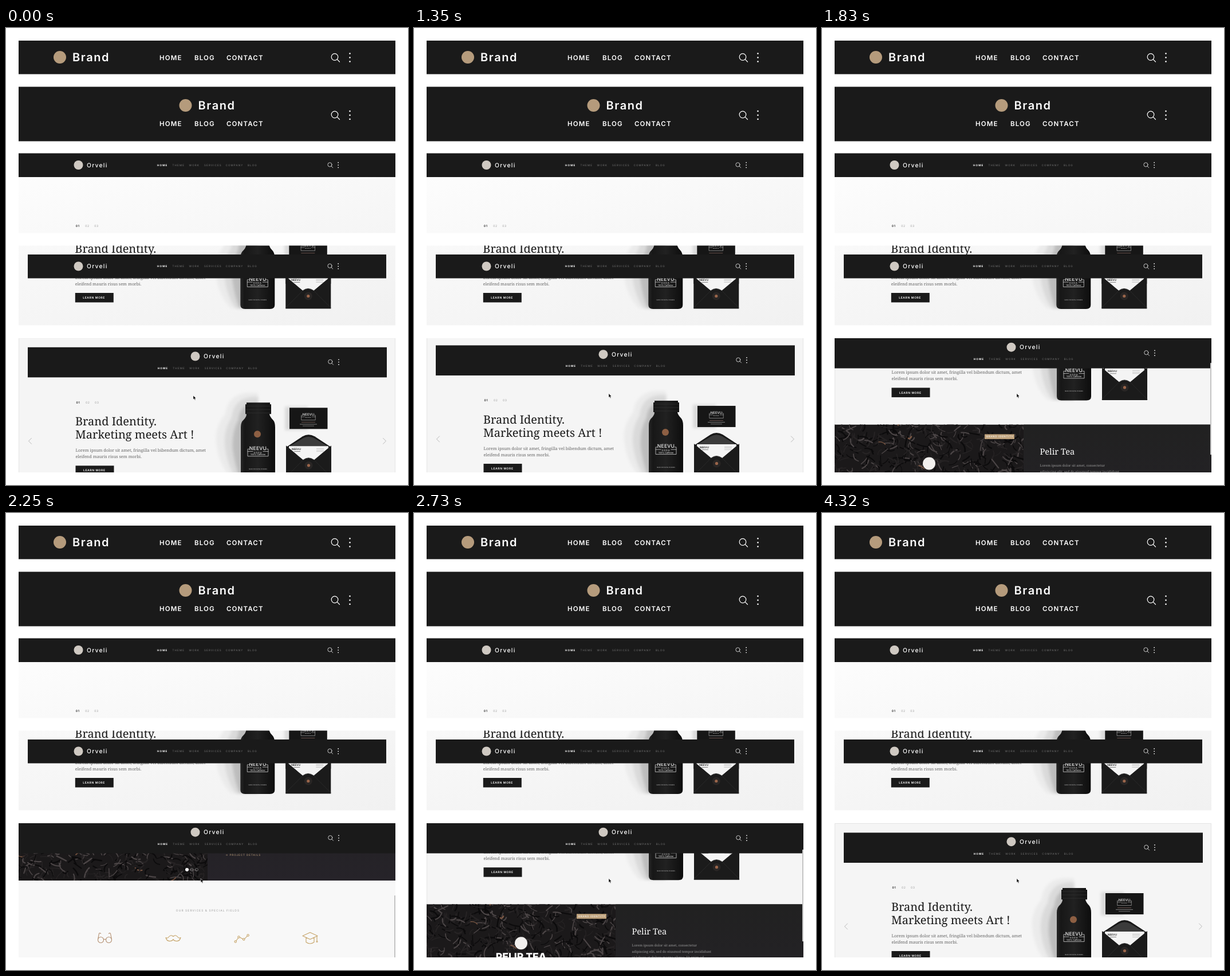
Write an HTML page that moves like this. It is 702 by 797 pixels and loops after 4950 ms.

```html
<!DOCTYPE html>
<html lang="en">
<head>
<meta charset="utf-8">
<title>Header layouts</title>
<style>
  html, body { margin: 0; width: 100%; height: 100%; overflow: hidden; background: #fff; }
  svg { display: block; }
  text { font-family: Inter, sans-serif; text-rendering: geometricPrecision; white-space: pre; }
  .serif { font-family: "Noto Serif", serif; }
  .mid { text-anchor: middle; }
  .line { fill: none; stroke-linecap: round; stroke-linejoin: round; }
</style>
</head>
<body>
<svg id="stage" width="702" height="797" viewBox="0 0 702 797"></svg>
<script>
const INK = '#1a1a1a', GOLD = '#b59b7c', LOOP = 4950;

const rect = (x, y, w, h, fill, more = '') =>
  `<rect x="${x}" y="${y}" width="${w}" height="${h}" fill="${fill}" ${more}/>`;
const dot = (x, y, r, fill, more = '') => `<circle cx="${x}" cy="${y}" r="${r}" fill="${fill}" ${more}/>`;
const path = (d, fill, more = '') => `<path d="${d}" fill="${fill}" ${more}/>`;
const line = (d, stroke, width = 1) => `<path class="line" d="${d}" stroke="${stroke}" stroke-width="${width}"/>`;
const text = (x, y, size, str, fill, spacing = 0, more = '') =>
  `<text x="${x}" y="${y}" font-size="${size}" fill="${fill}" letter-spacing="${spacing}" ${more}>${str}</text>`;
const shift = (x, y, body, id = '') => `<g id="${id}" transform="translate(${x} ${y})">${body}</g>`;
const view = (x, y, w, h, body) =>
  `<svg x="${x}" y="${y}" width="${w}" height="${h}" viewBox="${x} ${y} ${w} ${h}">${body}</svg>`;
const BOLD = 'font-weight="600"', MEDIUM = 'font-weight="500"', SERIF = 'class="serif"', MID = 'class="mid"';
const SOFT = 'filter="url(#soft)"';

// Seeded random numbers for the tea leaves
let seed = 7;
const random = () => (seed = seed * 16807 % 2147483647) / 2147483647;

// Search lens and menu dots, centred on y = 0
const tools = (x, y, k, gap) => shift(x, y,
  `<g transform="scale(${k})"><circle class="line" cx="0" cy="-1" r="5.8" stroke="#fff" stroke-width="1.2"/>` +
  line('M4.2 3.2L8.5 7.5', '#fff', 1.2) + '</g>' +
  [-1, 0, 1].map(i => dot(gap, i * 7 * k, 1.25 * k + .1, '#fff')).join(''));

const bigLogo = (x, y) => dot(x, y, 11, GOLD) + text(x + 22, y + 7, 20, 'Brand', '#fff', 1.6, BOLD);
const bigMenu = y => [['HOME', 268], ['BLOG', 329], ['CONTACT', 385]]
  .map(([s, x]) => text(x, y, 11.5, s, '#fff', 1.15, BOLD)).join('');
const smallLogo = (x, y) => dot(x, y, 8, '#cfc9c2') + text(x + 14.5, y + 3.7, 10.4, 'Orveli', '#fff', 1.2, MEDIUM);
const smallMenu = (x, y) =>
  [['HOME', 0], ['THEME', 26.5], ['WORK', 55.5], ['SERVICES', 82], ['COMPANY', 119.5], ['BLOG', 158]]
  .map(([s, dx], i) => text(x + dx, y, 4.6, s, i ? '#777' : '#fff', 1.1, i ? '' : 'font-weight="700"')).join('');
const smallBar = y => smallLogo(126.5, y) + smallMenu(264, y + 1.7) + tools(565.5, y, .62, 14.7);

const pager = text(122.5, 655.3, 5, '01', '#111', .6, BOLD) +
  text(139, 655.3, 5, '02', '#999', .6) + text(155, 655.3, 5, '03', '#999', .6);

const copy = text(121, 693.8, 20, 'Brand Identity.', INK, 0, SERIF) +
  text(121, 717, 20, 'Marketing meets Art !', INK, 0, SERIF) +
  text(121.5, 739.6, 7.35, 'Lorem ipsum dolor sit amet, fringilla vel bibendum dictum, amet', '#666', 0, SERIF) +
  text(121.5, 751, 7.35, 'eleifend mauris risus sem morbi.', '#666', 0, SERIF) +
  rect(121.5, 764, 67, 16.5, INK) + text(135, 774.1, 5, 'LEARN MORE', '#fff', .6, BOLD);

const label = (x, y, k) => `<g transform="translate(${x} ${y}) scale(${k})">` +
  text(0, 0, 8.6, 'NEEVU', '#eee', .2, `${MID} ${MEDIUM}`) + text(0, 5.8, 4, 'SODA', '#eee', 1, MID) +
  line('M-15 -1.5H-18V11H18V-1.5H15M-18 2.6H-9M9 2.6H18', '#ccc', .8) + '</g>';

const bottle =
  path('M440 637Q388 632 383 674Q362 700 368 730Q373 765 394 785H440Z', '#ebebeb', SOFT) +
  path('M440 644Q398 642 394 680Q378 705 383 735Q388 768 403 785H440Z', '#dadada', SOFT) +
  path('M440 655Q408 655 406 684Q394 705 396 735Q400 765 408 783H440Z', '#bdbdbd', SOFT) +
  path('M420 654H461V657H463V674H460Q461 679 466 684Q470 688 470 697V779Q470 786 462 786H418Q410 786 410 779V697' +
    'Q410 688 415 684Q420 679 420 674H418V657H420Z', 'url(#glass)') +
  line('M420 660H461M419 666H462M420 672H461', '#303030', .8) +
  dot(439, 709, 6, '#8d5f43') + label(440, 736.5, 1) +
  text(440, 746, 3.8, '100% Caffeine', '#eee', 0, MID) +
  text(440, 771, 2.2, 'MADE FOR DIGITAL PIONEERS', '#ddd', 0, MID);

const card = rect(487, 661, 40, 41, '#dadada', SOFT) + rect(495, 663, 66.5, 37, '#161616') +
  label(528, 677, .68) + rect(516, 688, 24, .7, '#8a6a64') + rect(513, 691.3, 30, .8, '#999') + rect(518, 694.3, 20, .8, '#888');

const envelope =
  path('M489 732L518 713Q528 707 539 713L568 732V742H489Z', '#181818') +
  path('M494 731L519 716Q528 711 538 716L563 731Z', '#3b3b3b') +
  path('M494 730H563V742L529 762L494 742Z', '#f4f4f4') +
  text(499, 737, 4.6, 'NEEVU', '#222', 0, BOLD) + rect(503, 739, 11, .7, '#555') +
  [734, 736.5, 739].map(y => rect(542, y, 13, .6, '#aaa')).join('') +
  path('M489 729L519 754Q528 747 538 754L568 729V785.5H489Z', '#1b1b1b') +
  line('M489 784L519 754Q528 747 538 754L568 784', '#2c2c2c', .8) +
  dot(528.5, 763.5, 7, '#292625') + dot(528.5, 763.5, 2.6, '#9a654a');

const products = bottle + card + envelope;

const leafTone = r => r < .4 ? '#0c0b0c' : r < .72 ? '#262324' : r < .98 ? '#4b4546' : '#7a5642';
const leaves = Array.from({ length: 950 }, () => {
  const x = 17 + random() * 335, y = 824 + random() * 216, a = random() * 7, n = 7 + random() * 12, b = random() * 12 - 6;
  const dx = Math.cos(a) * n, dy = Math.sin(a) * n;
  return line(`M${x} ${y}q${dx / 2 - b * dy / n} ${dy / 2 + b * dx / n} ${dx} ${dy}`, leafTone(random()), 1 + random() * 1.6);
}).join('');

const project = view(22, 828, 330, 212, rect(22, 828, 330, 212, '#1b191a') + leaves) +
  rect(352, 828, 328, 212, 'url(#plum)') +
  rect(284, 845, 52, 8.5, '#c0a37d') + text(287, 851, 4.5, 'BRAND IDENTITY', '#fff', .7) +
  dot(187, 896, 11, '#f2f0ee') +
  text(187, 925.5, 17.5, 'PELIR TEA', '#fff', 0, `${MID} font-weight="800"`) +
  dot(316, 1021, 3, '#fff') +
  [324.5, 333].map(x => dot(x, 1021, 2.4, 'none', 'stroke="#888" stroke-width=".8"')).join('') +
  text(380.5, 880.5, 14.6, 'Pelir Tea', '#fff', 0, SERIF) +
  ['Lorem ipsum dolor sit amet, consectetur', 'adipiscing elit, sed do eiusmod tempor incididunt',
   'ut labore et dolore magna aliqua. Ut enim ad', 'minim veniam, quis nostrud exercitation ullamco',
   'laboris nisi ut aliquip.'].map((s, i) => text(380.5, 902 + i * 10.6, 5.9, s, '#999', 0, SERIF)).join('') +
  text(383, 996.7, 4.6, '→ PROJECT DETAILS', '#c0a37d', .9);

const icons = [
  'M-12 3a5 5 0 1 0 10 0a5 5 0 1 0 -10 0M2 3a5 5 0 1 0 10 0a5 5 0 1 0 -10 0M-2 2.5Q0 1 2 2.5M-12 2L-10 -8Q-9 -10 -7 -8M12 2L10 -8Q9 -10 7 -8',
  'M0 -3Q-4 -7 -8 -2Q-10 1 -13 -1Q-11 6 -5 5Q-1 4.5 0 2Q1 4.5 5 5Q11 6 13 -1Q10 1 8 -2Q4 -7 0 -3Z',
  'M-9.5 4.5L-6 -.5M-3.4 -1.4L2 1.2M5.4 1L9.8 -3.8M-12.5 6a1.7 1.7 0 1 0 3.4 0a1.7 1.7 0 1 0 -3.4 0M-6.7 -2a1.7 1.7 0 1 0 3.4 0' +
    'a1.7 1.7 0 1 0 -3.4 0M2 2a1.7 1.7 0 1 0 3.4 0a1.7 1.7 0 1 0 -3.4 0M9.4 -5a1.7 1.7 0 1 0 3.4 0a1.7 1.7 0 1 0 -3.4 0',
  'M-13 -4L0 -10L13 -4L0 2ZM-7 -1V7Q0 12 7 7V-1M12 -3.5V5M12 5a1 1 0 1 0 .1 0'
];
const services = rect(22, 1040, 658, 260, '#f8f8f8') +
  text(352.5, 1094.3, 4.9, 'OUR SERVICES &amp; SPECIAL FIELDS', '#999', 1.1, MID) +
  icons.map((d, i) => shift(172.5 + i * 119.5, 1140.5, line(d, i ? '#c6a468' : '#b38f70', 1.1))).join('');

const page = rect(22, 541, 658, 287, '#f5f5f5') + line('M22.5 828V541.5H679.5V828', '#e4e4e4') +
  products + pager + copy + line('M44.5 716L39.5 721L44.5 726M658.5 716L663.5 721L658.5 726', '#aaa', .8) +
  project + services;

document.getElementById('stage').innerHTML = `<defs>
  <filter id="soft" x="-30%" y="-30%" width="160%" height="160%"><feGaussianBlur stdDeviation="2.5"/></filter>
  <linearGradient id="glass"><stop stop-color="#262626"/><stop offset=".12" stop-color="#171717"/>
    <stop offset=".5" stop-color="#212121"/><stop offset="1" stop-color="#0d0d0d"/></linearGradient>
  <linearGradient id="plum" x2="0" y2="1"><stop stop-color="#212121"/><stop offset="1" stop-color="#262329"/></linearGradient>
  <linearGradient id="paper" x2="1" y2="1"><stop stop-color="#fefefe"/><stop offset="1" stop-color="#f5f5f5"/></linearGradient>
  <linearGradient id="mist" x2="1" y2="1"><stop stop-color="#f9f9f9"/><stop offset="1" stop-color="#f1f1f1"/></linearGradient>
  </defs>` +
  rect(22, 22, 658, 58.5, INK) + bigLogo(94, 51) + bigMenu(55.7) + tools(574, 51.5, 1, 26.5) +
  rect(22, 102.5, 658, 95, INK) + bigLogo(313.5, 135) + bigMenu(171.3) + tools(574, 152, 1, 26.5) +
  rect(22, 218.5, 658, 139, 'url(#paper)') + shift(-.7, -308, pager) +
  rect(22, 218.5, 658, 41.5, INK) + smallBar(239) +
  view(22, 379.5, 658, 139, rect(22, 379, 658, 140, 'url(#mist)') + shift(-.7, -296, products) +
    shift(-.7, -302, copy) + rect(38, 395, 626, 41.5, INK) + smallBar(415.5)) +
  view(22, 541, 658, 234, shift(0, 0, page, 'page') +
    shift(0, 0, rect(38, 0, 627, 52.5, INK, 'id="back"') + smallLogo(330.5, 15.7) + smallMenu(264.8, 38) +
      tools(566.3, 25.8, .62, 14.7), 'bar') +
    rect(678, 541, 2, 160, '#c4c4c4', 'id="thumb"')) +
  shift(340, 637.5, path('M0 0V6.8L1.6 5.4L2.8 8L4 7.4L2.8 5H5Z', '#000', 'stroke="#fff" stroke-width=".5"'), 'cursor');

const [pageEl, bar, back, thumb, cursor] =
  ['page', 'bar', 'back', 'thumb', 'cursor'].map(id => document.getElementById(id));
const move = (el, x, y) => el.setAttribute('transform', `translate(${x} ${y})`);

// Scroll position over time: [ms, px], joined by smooth cubics
const keys = [[900, .7], [1350, 4], [1600, 36], [1830, 136], [2050, 290], [2250, 399], [2330, 399],
  [2520, 300], [2730, 146.5], [2950, 18], [3060, 4], [3150, 0]];
const slope = i => {
  const a = keys[i - 1], b = keys[i], c = keys[i + 1];
  return a && c && (b[1] - a[1]) * (c[1] - b[1]) > 0 ? (c[1] - a[1]) / (c[0] - a[0]) : 0;
};
function scrollAt(t) {
  if (t <= keys[0][0]) return keys[0][1];
  const i = keys.findIndex(k => k[0] > t) - 1;
  if (i < 0) return 0;
  const [t0, s0] = keys[i], [t1, s1] = keys[i + 1], d = t1 - t0, u = (t - t0) / d, v = 1 - u;
  return v * v * (1 + 2 * u) * s0 + u * u * (1 + 2 * v) * s1 + u * v * d * (v * slope(i) - u * slope(i + 1));
}

function draw(now) {
  const t = now % LOOP, s = scrollAt(t), docked = s >= 16.5;
  move(pageEl, 0, -s);
  move(bar, 0, Math.max(541, 557.5 - s));
  back.setAttribute('x', docked ? 22 : 38);
  back.setAttribute('width', docked ? 658 : 627);
  thumb.setAttribute('y', 541 + s * .316);
  thumb.setAttribute('opacity', docked ? 1 : 0);
  if (t < 90) move(cursor, 327, 641);
  else move(cursor, 340, 637.5);
}

const start = performance.now();
function tick() {
  draw(performance.now() - start);
  requestAnimationFrame(tick);
}
tick();
</script>
</body>
</html>
```
